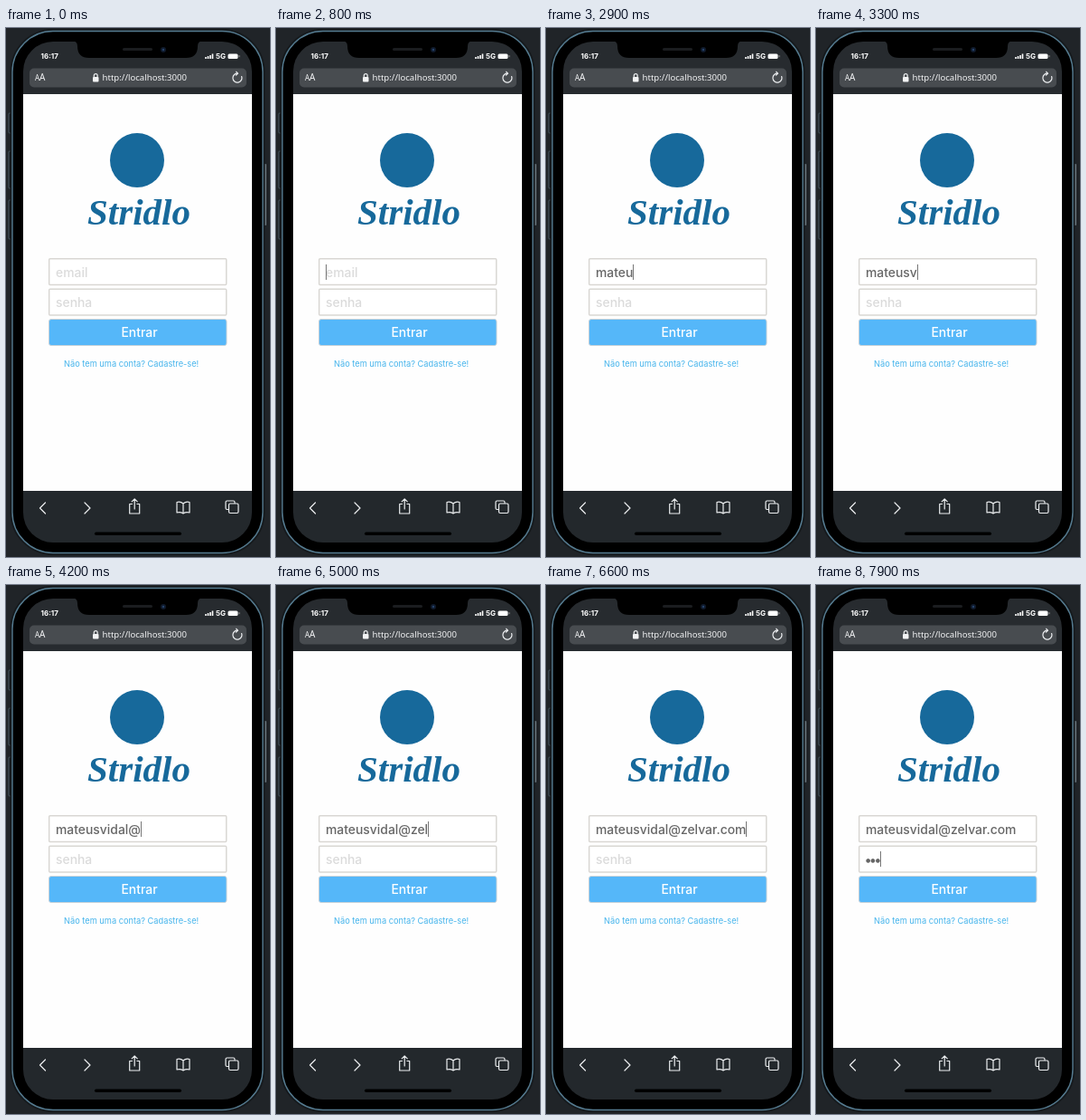
These frames come from a looping animation (292x584 px, 8000 ms). An HTML page:

```html
<!DOCTYPE html>
<html lang="pt-BR">
<head>
<meta charset="utf-8">
<title>Login</title>
<style>
  html, body { margin: 0; width: 100%; height: 100%; overflow: hidden; background: #202428; }
  svg { display: block; width: 292px; height: 584px; }
  text { font-family: Inter, sans-serif; white-space: pre; }
  .form { font-size: 13.9px; font-weight: 500; }
  .typed { fill: #666; }
  .hint { fill: #dbdbdb; }
  .dots { font-family: "DejaVu Sans", sans-serif; font-size: 6.1px; fill: #666; }
  .box { fill: #fff; stroke: #d9d7d3; stroke-width: 1.5; }
  .status { font-size: 8px; font-weight: 700; fill: #fff; }
  .bar { font-family: "Noto Sans", sans-serif; fill: #f2f3f4; }
  .icon { fill: none; stroke: #eceef0; stroke-width: 1.2; stroke-linecap: round; stroke-linejoin: round; }
  .name { font: italic 700 41px "Liberation Serif", serif; fill: #17699b; }
</style>
</head>
<body>
<svg viewBox="0 0 292 584">
  <defs>
    <clipPath id="screen"><rect x="19" y="15" width="253" height="553" rx="33"/></clipPath>
  </defs>

  <!-- phone body -->
  <g fill="#16191c" stroke="#4b5a64" stroke-width="1">
    <rect x="3" y="94" width="3" height="22" rx="1"/>
    <rect x="3" y="136" width="3" height="41" rx="1"/>
    <rect x="3" y="190" width="3" height="43" rx="1"/>
  </g>
  <rect x="285" y="150" width="3" height="68" rx="1" fill="#69757c"/>
  <rect x="6" y="2.5" width="279" height="578" rx="46" fill="#000" stroke="#15191c" stroke-width="3"/>
  <rect x="7" y="3.5" width="277" height="576" rx="45" fill="#000" stroke="#557b90" stroke-width="1.4"/>

  <g clip-path="url(#screen)">
    <rect x="19" y="15" width="253" height="58" fill="#272b2f"/>
    <rect x="19" y="73" width="253" height="438" fill="#fefefe"/>
    <rect x="19" y="511" width="253" height="57" fill="#23282c"/>
  </g>

  <!-- notch -->
  <path d="M74 14H217Q212 15 212 20Q212 33 199 33H92Q79 33 79 20Q79 15 74 14Z" fill="#000"/>
  <rect x="129" y="22" width="33" height="3" rx="1.5" fill="#1b1d20"/>
  <circle cx="174" cy="24" r="3" fill="#101a2b"/>
  <circle cx="174" cy="24" r="1.2" fill="#25436b"/>

  <!-- status and address bars -->
  <text class="status" x="38.5" y="33.5">16:17</text>
  <text class="status" x="232" y="34">5G</text>
  <path d="M221 34v-2M223.5 34v-3M226 34v-4M228.5 34v-5.5" stroke="#fff" stroke-width="1.6"/>
  <rect x="245.5" y="28.5" width="11" height="5.5" rx="1.5" fill="#fff"/>
  <path d="M258 30.2v2" stroke="#999"/>
  <rect x="26" y="44.5" width="240" height="21" rx="5" fill="#484c50"/>
  <text class="bar" x="32" y="58" font-size="8">A</text>
  <text class="bar" x="37" y="58" font-size="10">A</text>
  <rect x="96" y="54" width="6.5" height="5.5" rx="1" fill="#f2f3f4"/>
  <path class="icon" d="M97.3 54v-1.5a1.95 1.95 0 0 1 3.9 0v1.5"/>
  <text class="bar" x="106.5" y="58" font-size="9.6">http://localhost:3000</text>
  <path class="icon" d="M260.6 53.5A5 5 0 1 1 256.5 50.2l-1.8-1.9M256.5 50.2l-2 2"/>

  <!-- page -->
  <circle cx="145" cy="146" r="30" fill="#17699b"/>
  <text class="name" x="147" y="217" text-anchor="middle">Stridlo</text>
  <rect class="box" x="47.7" y="254.7" width="196" height="28.8" rx="1"/>
  <rect class="box" x="47.7" y="288.2" width="196" height="28.8" rx="1"/>
  <text class="form" id="email" x="55" y="274.5"></text>
  <text class="form" id="pass" x="55" y="308"></text>
  <rect id="caret" width="1" height="17" fill="#777"/>
  <rect x="47.5" y="321.5" width="196.5" height="29" rx="2.5" fill="#55b7f9" stroke="#c9d3d9"/>
  <text class="form" x="147.5" y="340.5" text-anchor="middle" fill="#fff">Entrar</text>
  <text x="64" y="374" font-size="9.25" fill="#45b4ec">Não tem uma conta? Cadastre-se!</text>

  <!-- bottom bar -->
  <g class="icon">
    <path d="M43.5 524l-6 6 6 6"/>
    <path d="M87 524l6 6-6 6"/>
    <path d="M139.5 525.5h-2.8v10.5h11v-10.5h-2.8M142.2 531v-11M139.2 522.8l3-3 3 3"/>
    <path d="M196 525q-3-2.5-7-1.5v11.5q4-1 7 1 3-2 7-1v-11.5q-4-1-7 1.5v11"/>
    <path d="M246 531.5h-1.5q-1.5 0-1.5-1.5v-6.5q0-1.5 1.5-1.5h7q1.5 0 1.5 1.5v1"/>
    <rect x="246.5" y="525" width="10.5" height="10.5" rx="1.5"/>
  </g>
  <rect x="98" y="556.5" width="96" height="3.5" rx="1.7" fill="#000"/>
</svg>

<script>
const LOOP = 8000;
const ADDRESS = 'mateusvidal@zelvar.com';
// times at which each further character is present
const EMAIL_KEYS = [1200, 1400, 2000, 2400, 2700, 3000, 3200, 3500, 3500, 3600, 3800,
  4200, 4700, 4900, 5000, 5300, 5300, 5700, 6100, 6500, 6500, 6600];
const PASS_KEYS = [7500, 7700, 7900];
const EMAIL_FOCUS = 600, PASS_FOCUS = 6900;

const [email, pass, caret] = ['email', 'pass', 'caret'].map(id => document.getElementById(id));
const pressed = (keys, t) => keys.filter(k => k <= t).length;

// Shows the value or its placeholder and returns the width before the caret.
function fill(field, value, hint, style) {
  const text = value || hint;
  if (field.textContent !== text) field.textContent = text;
  field.setAttribute('class', value ? style : 'form hint');
  return value ? field.getComputedTextLength() : 0;
}

function draw(t) {
  const dots = '●'.repeat(pressed(PASS_KEYS, t));
  pass.setAttribute('y', dots ? 306.2 : 308);
  const emailWidth = fill(email, ADDRESS.slice(0, pressed(EMAIL_KEYS, t)), 'email', 'form typed');
  const passWidth = fill(pass, dots, 'senha', 'dots');
  const onPass = t >= PASS_FOCUS;
  caret.setAttribute('x', Math.round(55 + (onPass ? passWidth : emailWidth)));
  caret.setAttribute('y', onPass ? 294 : 261);
  caret.setAttribute('visibility', t < EMAIL_FOCUS ? 'hidden' : 'visible');
}

const start = performance.now();
function tick() {
  draw((performance.now() - start) % LOOP);
  requestAnimationFrame(tick);
}
tick();
</script>
</body>
</html>
```
